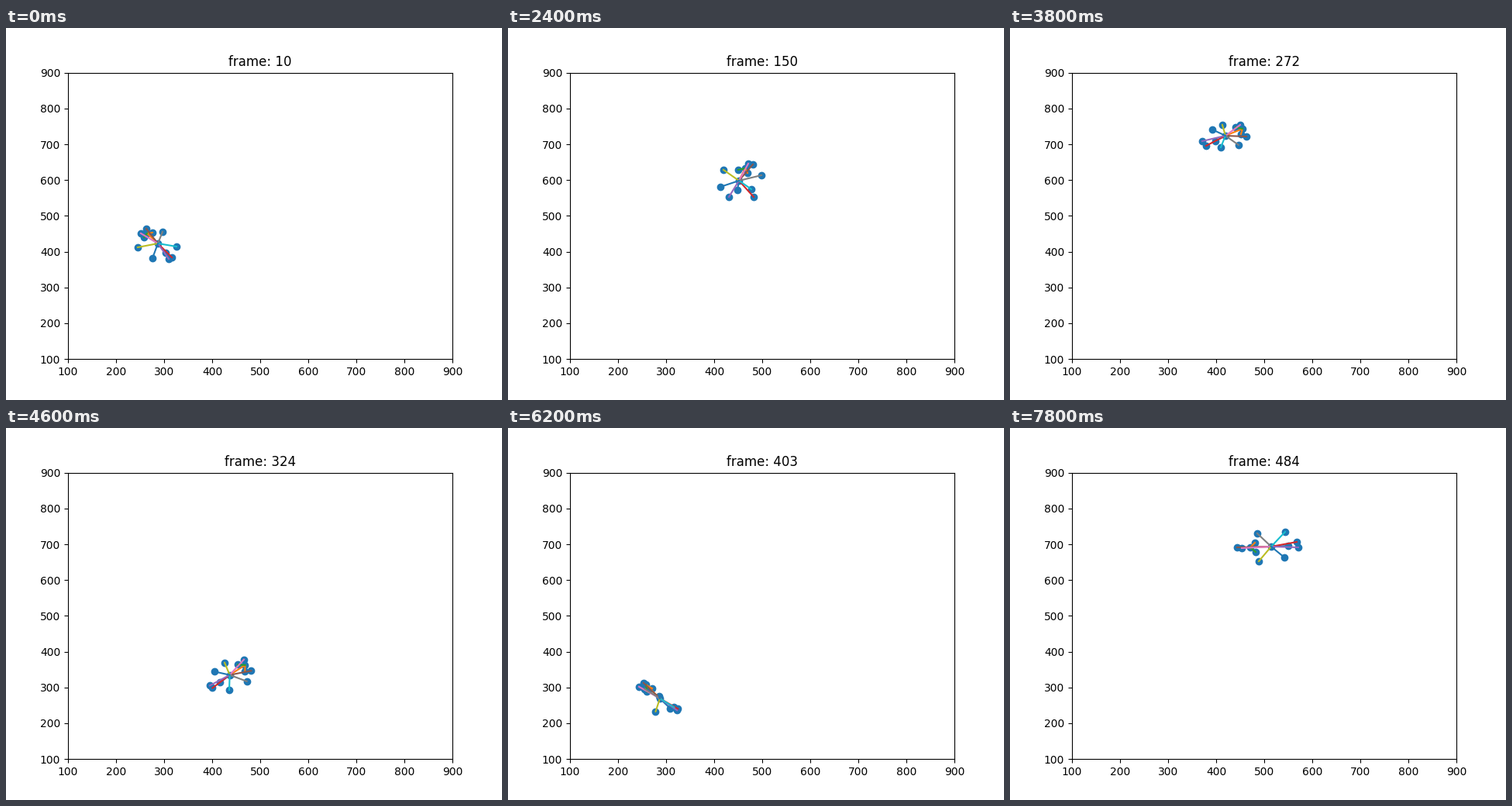
These frames come from a looping animation (640 by 480 pixels, 8 s). A matplotlib script:

```python
import matplotlib.pyplot as plt
import numpy as np
from matplotlib.animation import FuncAnimation

STEPS, INTERVAL = 40, 200
KEYS = [0, 6, 12, 19, 27, 34, 39]
COUNTER = [10, 86, 150, 272, 377, 422, 484]

# Thorax path in pixels: step, x, y
PATH = np.array([
    (0, 196, 278), (1, 226, 330), (3, 370, 396), (4, 452, 385), (5, 498, 340),
    (6, 465, 291), (7, 420, 297), (10, 155, 215), (11, 220, 192),
    (12, 298, 197), (14, 338, 165), (16, 312, 140), (19, 278, 139),
    (21, 380, 180), (24, 243, 388), (26, 336, 340), (27, 317, 305),
    (30, 112, 330), (32, 280, 368), (34, 475, 341), (36, 467, 347),
    (37, 430, 275), (38, 365, 195), (39, 337, 153)])

# Offsets from the thorax at each key step, in pixels (x + y*1j, y down)
TRUNK = {
    "head": [-14-13j, -12+18j, 8-16j, 22-9j, 17-16j, -24+11j, -27+1j],
    "eye_r": [-7-14j, -16+11j, 11-10j, 20-2j, 19-8j, -12+7j, -21-5j],
    "eye_l": [-18-8j, -2+16j, -1-14j, 13-11j, 7-15j, -16+13j, -20+7j],
    "abdomen": [10+12j, 10-13j, -2+12j, -13+7j, -11+12j, 19-8j, 22-1j],
    "wing_r": [18+18j, 12-26j, 19+21j, -25+13j, -19+20j, 18-20j, 33-6j],
    "wing_l": [14+20j, 17-22j, -13+21j, -30+7j, -20+19j, 20-18j, 35+1j],
}
LEGS = {
    "fore_r": [-15-19j, -26+13j, 18-21j, 27+1j, 27-12j, -24+20j, -44+1j],
    "fore_l": [-22-13j, 4+19j, 12-22j, 19-14j, 16-26j, -24+20j, -38+2j],
    "mid_r": [6-15j, -22-8j, 29-7j, 17+12j, 26+3j, -15+33j, -18-17j],
    "mid_l": [-26+5j, 22+1j, -20-14j, -4-14j, -10-17j, 21+5j, -16+19j],
    "hind_r": [24+4j, -12-22j, 16+11j, -6+15j, 6+22j, 29-6j, 18-19j],
    "hind_l": [-7+19j, 22-16j, -24+8j, -17-8j, -21+0j, -21-5j, 17+14j],
}
HIDDEN = {6: ("hind_r", "hind_l"), 27: ("fore_r", "fore_l")}

CHAINS = [("thorax", "abdomen"), ("thorax", "head", "eye_r"),
          ("head", "eye_l"), ("thorax", "wing_r"), ("thorax", "wing_l")]
CHAINS += [("thorax", leg) for leg in LEGS]

heading = np.unwrap(np.angle(TRUNK["head"]))
body = {name: np.array(z) * np.exp(-1j * heading)
        for name, z in {**TRUNK, **LEGS}.items()}


def to_data(z):
    return 100 + (z.real - 80) / 0.62, 100 + (427.2 - z.imag) / 0.462


def pose(step):
    t, x, y = PATH.T
    thorax = complex(np.interp(step, t, x), np.interp(step, t, y))
    turn = np.exp(1j * np.interp(step, KEYS, heading))
    points = {"thorax": to_data(thorax)}
    for name, z in body.items():
        points[name] = to_data(thorax + turn * np.interp(step, KEYS, z))
    for name in HIDDEN.get(step, ()):
        points[name] = (np.nan, np.nan)
    return points


fig, ax = plt.subplots(figsize=(6.4, 4.8), dpi=100)
ax.set_xlim(100, 900)
ax.set_ylim(100, 900)
title = ax.set_title("")
dots = ax.scatter([], [], color="C0")
lines = [ax.plot([], [], color=f"C{i}")[0] for i in range(len(CHAINS))]


def update(step):
    points = pose(step)
    dots.set_offsets(list(points.values()))
    for line, chain in zip(lines, CHAINS):
        line.set_data(*zip(*(points[name] for name in chain)))
    title.set_text(f"frame: {round(np.interp(step, KEYS, COUNTER))}")
    return [title, dots, *lines]


anim = FuncAnimation(fig, update, frames=STEPS, interval=INTERVAL,
                     init_func=lambda: update(0), repeat=True, repeat_delay=0)
plt.show()
```
